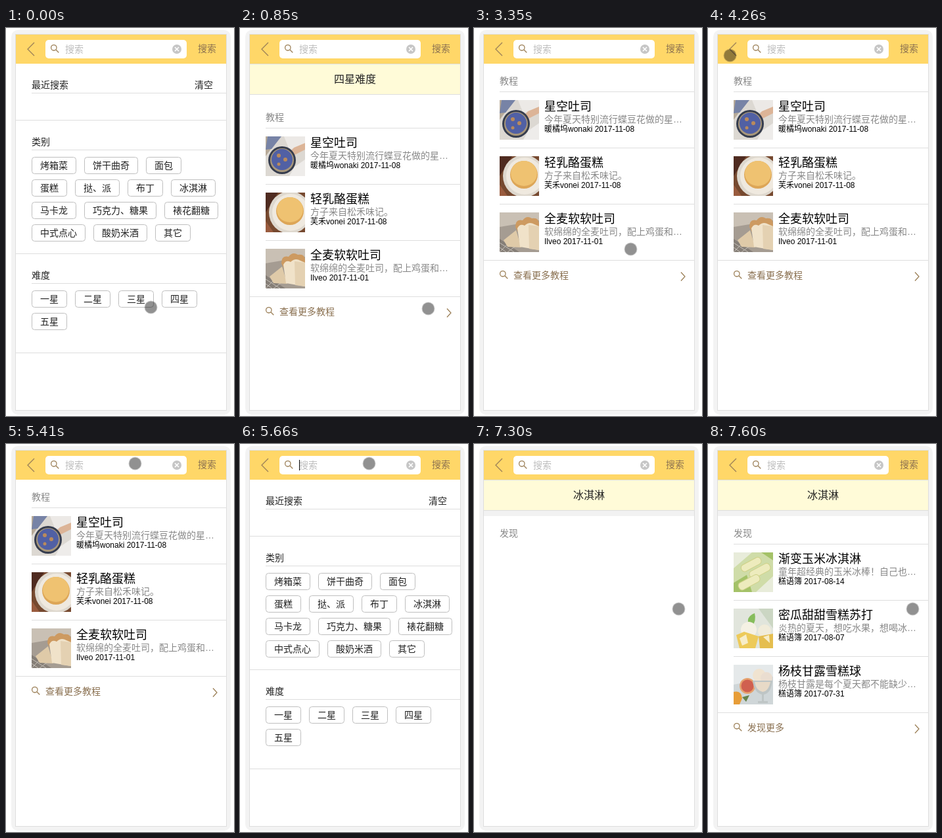
Recreate the animation shown at these times as an HTML page. Size 347x587 px, loop 8000 ms.

```html
<!DOCTYPE html>
<html lang="zh-CN">
<head>
<meta charset="utf-8">
<title>搜索</title>
<style>
  html, body { margin: 0; width: 100%; height: 100%; overflow: hidden; background: #fff; }
  svg { display: block; }
  text { font: 14px "Liberation Sans", "Noto Sans CJK SC", sans-serif; fill: #222; white-space: pre; }
  .mid { text-anchor: middle; font-size: 16px; }
  .name { font-size: 18px; fill: #000; }
  .soft { fill: #888; }
  .by { font-size: 12px; fill: #000; }
  .brown { fill: #8a7050; }
  .hint { fill: #bdbdbd; }
  .line { fill: #dedede; }
  .tag { fill: #fff; stroke: #bfbfbf; }
  .icon { fill: none; stroke: #9c8058; stroke-width: 1.3; }

  .anim { animation: 8s step-end infinite; }
  #search { animation-name: search; }
  #starBar { animation-name: starBar; }
  #starList { animation-name: starList; }
  #icePage { animation-name: icePage; }
  #iceList { animation-name: iceList; }
  #iceList .late { animation-name: late; }
  #caret { animation-name: caret; }
  #pointer { animation-name: pointer; }

  @keyframes search { 0%, 70.75% { opacity: 1 } 10.625%, 91.25%, 100% { opacity: 0 } }
  @keyframes starBar { 0%, 31.75%, 100% { opacity: 0 } 10.625% { opacity: 1 } }
  @keyframes starList {
    0% { opacity: 0; transform: translateY(0) }
    10.625% { opacity: 1; transform: translateY(0) }
    31.75% { opacity: 1; transform: translateY(-55px) }
    70.75%, 100% { opacity: 0; transform: translateY(0) }
  }
  @keyframes icePage { 0% { opacity: 0 } 91.25%, 100% { opacity: 1 } }
  @keyframes iceList { 0% { opacity: 0 } 93.125%, 100% { opacity: 1 } }
  @keyframes late { 0% { opacity: 0 } 95%, 100% { opacity: 1 } }
  @keyframes caret { 0%, 76.25%, 87.75%, 100% { opacity: 0 } 70.75%, 81.5% { opacity: 1 } }
  @keyframes pointer {
    0% { transform: translate(220.5px, 422.5px) }
    1.875% { transform: translate(255px, 423px) }
    3.375% { transform: translate(283.5px, 423.5px) }
    5.25% { transform: translate(286.5px, 423px) }
    8.75% { transform: translate(286.5px, 424.5px) }
    21.5% { transform: translate(294px, 442px) }
    23% { transform: translate(299px, 450.5px) }
    25% { transform: translate(297.5px, 450.5px) }
    26.75% { transform: translate(285px, 443px) }
    28.25% { transform: translate(272.5px, 434.5px) }
    41.875% { transform: translate(238.5px, 334.5px) }
    43.75% { transform: translate(140px, 150px) }
    45.25% { transform: translate(60px, 55px) }
    46.75% { transform: translate(37.5px, 20.5px) }
    51.75% { transform: translate(35px, 31px) }
    53.25% { transform: translate(33.5px, 41.5px) }
    65.75% { transform: translate(157.5px, 30.5px) }
    67.625% { transform: translate(196.5px, 29.5px) }
    78.125% { transform: translate(231.5px, 199.5px) }
    80% { transform: translate(272px, 226px) }
    81.5% { transform: translate(300.5px, 241.5px) }
    83% { transform: translate(316px, 248px) }
    84.5% { transform: translate(320.5px, 248.5px) }
    86.25% { transform: translate(315px, 249px) }
    87.75%, 100% { transform: translate(311.5px, 249.5px) }
  }
</style>
</head>
<body>
<svg width="347" height="587" viewBox="0 0 347 587">
  <defs>
    <g id="lens" class="icon"><circle cx="4.8" cy="4.8" r="4.2"/><path d="M7.8 7.8 12.3 12.3"/></g>

    <symbol id="toast" viewBox="0 0 60 60">
      <path fill="#dcd8d2" d="M0 0h60v60H0z"/>
      <path fill="#b7aa98" d="M0 0h22L0 30z"/>
      <path fill="#7783a6" d="M3 0h21L9 19 0 20z"/>
      <path fill="#ece9e6" d="M28 0h32v13L36 20z"/>
      <path fill="#dcb497" d="M60 10 43 17 35 26 44 28 60 20z"/>
      <ellipse cx="25" cy="36" rx="21" ry="21" fill="#363d4e"/>
      <ellipse cx="25" cy="36" rx="18" ry="18" fill="#a8977b"/>
      <ellipse cx="25" cy="35" rx="16" ry="16" fill="#5160a4"/>
      <g fill="#b98a5c"><circle cx="20" cy="29" r="3"/><circle cx="30" cy="35" r="3"/><circle cx="20" cy="42" r="2.5"/></g>
      <path fill="#eeecea" d="M44 46 60 35V60H36z"/>
    </symbol>
    <symbol id="cake" viewBox="0 0 60 60">
      <path fill="#76492f" d="M0 0h60v60H0z"/>
      <path fill="#4f2b20" d="M0 0h19L0 30z"/>
      <ellipse cx="37" cy="30" rx="32" ry="32" fill="#ded8ce"/>
      <ellipse cx="38" cy="30" rx="28" ry="28" fill="#efe9df"/>
      <ellipse cx="37" cy="28" rx="21" ry="21" fill="#dda657"/>
      <ellipse cx="37" cy="26" rx="20" ry="19" fill="#efc271"/>
      <path fill="#995b3e" d="M0 43 12 60H0z"/>
    </symbol>
    <symbol id="loaf" viewBox="0 0 60 60">
      <path fill="#a59c92" d="M0 0h60v60H0z"/>
      <path fill="#c9c0b4" d="M0 0h60v12L0 22z"/>
      <path fill="#857e77" d="M0 40 30 60H0z"/>
      <path fill="none" stroke="#c6c0b8" d="M0 46 22 60M0 53 10 60M0 60 16 44M12 60 27 49"/>
      <path fill="#dfcaa8" d="M6 42 25 27 33 53 12 52z"/>
      <path fill="#cd9a61" d="M24 22Q24 9 35 12 41 4 49 9 60 7 60 18V30H28z"/>
      <path fill="#f0e2c9" d="M27 24Q31 16 38 20 45 13 53 18L60 21V57L31 52z"/>
      <path fill="#e4d1b2" d="M44 19 45 55 60 57V21z"/>
    </symbol>
    <symbol id="corn" viewBox="0 0 60 60">
      <path fill="#cfdca8" d="M0 0h60v60H0z"/>
      <path fill="#e8ecda" d="M0 0h28L0 24zM60 36V60H34z"/>
      <path fill="#a4c268" d="M0 46 20 34 28 60H0zM42 0h18v12z"/>
      <g fill="#edebbd" stroke="#ced187">
        <rect x="10" y="13" width="33" height="11" rx="5" transform="rotate(-28 26 18)"/>
        <rect x="23" y="22" width="34" height="12" rx="5" transform="rotate(-28 40 28)"/>
        <rect x="6" y="39" width="35" height="12" rx="5" transform="rotate(-28 24 45)"/>
      </g>
    </symbol>
    <symbol id="melon" viewBox="0 0 60 60">
      <path fill="#e1e5dc" d="M0 0h60v60H0z"/>
      <path fill="#cbd6c3" d="M38 0h22v30z"/>
      <path fill="#86bd5c" d="M24 26Q17 13 32 7 35 18 28 27z"/>
      <circle cx="23" cy="32" r="12" fill="#f5f1e4"/>
      <circle cx="47" cy="34" r="10" fill="#f1ecda"/>
      <path fill="#edca59" d="M4 40 16 35 38 42 33 60H9z"/>
      <path fill="#e5be4f" d="M38 42 60 38V60H40z"/>
      <path fill="#f7edc8" d="M9 45 19 39 22 52 13 56zM45 43 54 40 55 52z"/>
    </symbol>
    <symbol id="sundae" viewBox="0 0 60 60">
      <path fill="#cfd6d8" d="M0 0h60v60H0z"/>
      <path fill="#e5e9ea" d="M0 0h60v18L0 30z"/>
      <circle cx="21" cy="32" r="12" fill="#e6a26e"/>
      <circle cx="21" cy="32" r="9.5" fill="#d0604f"/>
      <circle cx="39" cy="16" r="10" fill="#f0e3d0"/>
      <circle cx="50" cy="20" r="9" fill="#eaddd0"/>
      <path fill="#bec5c5" d="M29 24h30Q57 43 46 45v10h6v3H37v-3h6V45Q31 42 29 24z"/>
      <path fill="#e8dac7" d="M32 26h24Q53 40 44 41 34 39 32 26z"/>
      <path fill="#e79d38" d="M0 41Q12 38 13 51L9 60H0z"/>
      <path fill="#66844b" d="M13 49 24 46 19 56z"/>
    </symbol>
  </defs>

  <rect x="8" y="3" width="334" height="582" rx="10" fill="#f3f3f3"/>
  <rect x="14.5" y="9.5" width="321" height="569" fill="#fff" stroke="#dedede"/>

  <g id="search" class="anim"></g>
  <g id="starBar" class="anim"></g>
  <g id="starList" class="anim"></g>
  <g id="icePage" class="anim"></g>

  <path fill="#ffd768" d="M15 10h320v44H15z"/>
  <path class="icon" d="M43 22 33 32 43 42"/>
  <rect x="60" y="18" width="215" height="28" rx="5" fill="#fff"/>
  <use href="#lens" x="68" y="25"/>
  <text class="hint" x="90" y="37">搜索</text>
  <circle cx="260" cy="32" r="7" fill="#c6c6c6"/>
  <path stroke="#fff" stroke-width="1.6" d="M257 29l6 6M263 29l-6 6"/>
  <text class="brown" x="292" y="36">搜索</text>
  <rect id="caret" class="anim" x="90" y="24" width="1" height="16" fill="#000"/>
  <circle id="pointer" class="anim" r="9.5" fill="#000" fill-opacity=".43"/>
</svg>
<script>
  const put = (id, markup) => { document.getElementById(id).innerHTML = markup; };
  const text = (x, y, str, cls = '') => `<text class="${cls}" x="${x}" y="${y}">${str}</text>`;
  const line = (x, y) => `<rect class="line" x="${x}" y="${y}" width="${335 - x}" height="1"/>`;

  // Tags flow left to right and wrap at the right margin
  function tags(top, words) {
    let x = 39, y = top;
    return words.split(' ').map(word => {
      const w = word.length * 14 + 26;
      if (x + w > 329) { x = 39; y += 34; }
      const tag = `<rect class="tag" x="${x + .5}" y="${y + .5}" width="${w - 1}" height="25" rx="4"/>`
        + text(x + 13, y + 18, word);
      x += w + 12;
      return tag;
    }).join('');
  }

  const bar = title => '<path fill="#fffbd8" d="M15 54h320v46H15z"/>'
    + line(15, 54) + text(175, 83, title, 'mid') + line(15, 100);

  const item = ([pic, name, about, by, cls = ''], i) => {
    const y = 151 + i * 85;
    return line(39, y)
      + `<use class="${cls}" href="#${pic}" x="39" y="${y + 13}" width="60" height="60"/>`
      + text(107, y + 29, name, 'name') + text(107, y + 47, about, 'soft') + text(107, y + 61, by, 'by');
  };

  const list = (items, more) => items.map(item).join('') + line(15, 406)
    + '<use href="#lens" x="39" y="422"/>' + text(60, 434, more, 'brown')
    + '<path class="icon" d="M315 424.5 321 431 315 437.5"/>';

  put('search',
    text(39, 91, '最近搜索') + text(287, 91, '清空') + line(39, 98) + line(15, 139)
    + text(39, 177, '类别') + line(39, 184)
    + tags(195, '烤箱菜 饼干曲奇 面包 蛋糕 挞、派 布丁 冰淇淋 马卡龙 巧克力、糖果 裱花翻糖 中式点心 酸奶米酒 其它')
    + line(15, 341) + text(39, 379, '难度') + line(39, 386)
    + tags(397, '一星 二星 三星 四星 五星') + line(15, 491));

  put('starBar', bar('四星难度'));
  put('starList', text(39, 140, '教程', 'soft') + list([
    ['toast', '星空吐司', '今年夏天特别流行蝶豆花做的星…', '暖橘坞wonaki 2017-11-08'],
    ['cake', '轻乳酪蛋糕', '方子来自松禾味记。', '芙禾vonei 2017-11-08'],
    ['loaf', '全麦软软吐司', '软绵绵的全麦吐司，配上鸡蛋和…', 'Ilveo 2017-11-01']
  ], '查看更多教程'));

  put('icePage', bar('冰淇淋') + '<path fill="#f2f2f2" d="M15 101h320v8H15z"/>'
    + text(39, 140, '发现', 'soft') + '<g id="iceList" class="anim"></g>');
  put('iceList', list([
    ['corn', '渐变玉米冰淇淋', '童年超经典的玉米冰棒！自己也…', '糕语簿 2017-08-14', 'anim late'],
    ['melon', '密瓜甜甜雪糕苏打', '炎热的夏天，想吃水果，想喝冰…', '糕语簿 2017-08-07'],
    ['sundae', '杨枝甘露雪糕球', '杨枝甘露是每个夏天都不能缺少…', '糕语簿 2017-07-31']
  ], '发现更多'));
</script>
</body>
</html>
```
